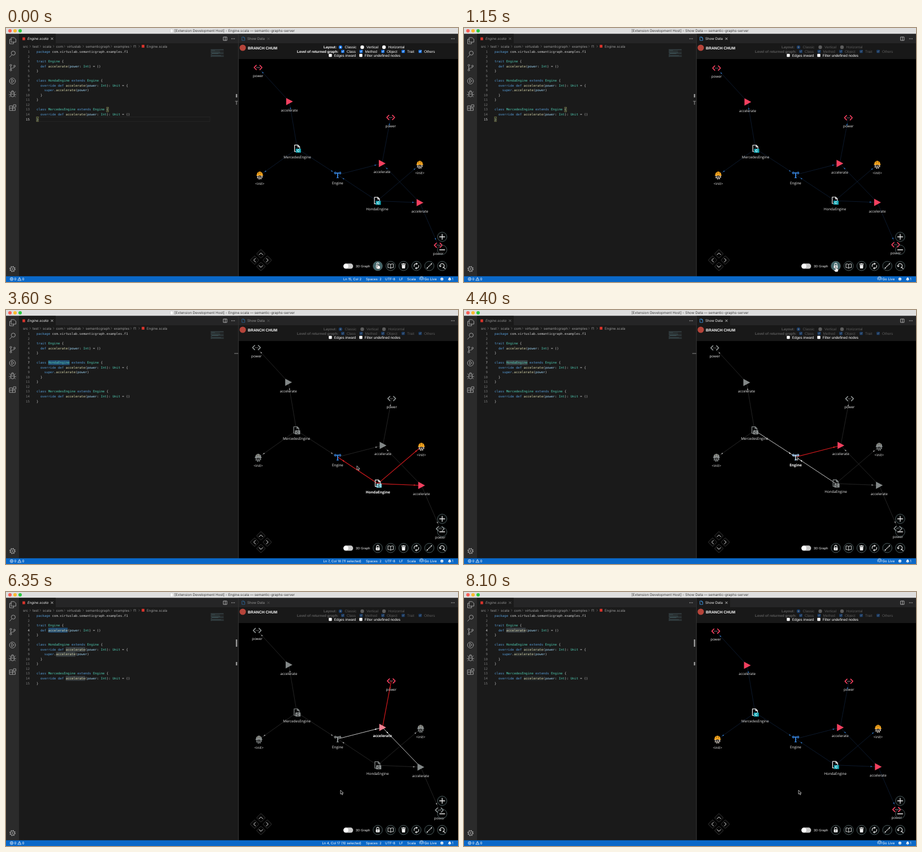
An HTML page that plays this animation: 800 px wide and 450 px high, repeating every 8200 ms.

```html
<!DOCTYPE html>
<html lang="en">
<head>
<meta charset="utf-8">
<title>Code graph</title>
<style>
html, body { margin: 0; width: 100%; height: 100%; overflow: hidden; background: #000; }
svg { display: block; width: 800px; height: 450px; }
text { white-space: pre; text-rendering: geometricPrecision; }
.ui { font-family: Inter, sans-serif; font-size: 6.1px; }
.code { font-family: "DejaVu Sans Mono", monospace; font-size: 5.72px; }
.web { font-family: "Liberation Sans", sans-serif; font-size: 6.4px; }
.node { font-family: "Open Sans", sans-serif; font-size: 6.3px; fill: #eee; text-anchor: middle; }
.node.bold { font-size: 6.5px; font-weight: 700; fill: #fff; }
.line { fill: none; stroke-linecap: round; stroke-linejoin: round; }
</style>
</head>
<body>
<svg viewBox="0 0 800 450">
  <g id="base"></g>
  <g id="marks"></g>
  <g id="code"></g>
  <g id="chrome"></g>
  <g id="graph"></g>
  <g id="tools"></g>
  <g id="pointer"></g>
</svg>
<script>
const LOOP = 8200, CHAR = 3.446, ROW = 8.54, LEFT = 54;
const put = (id, html) => { document.getElementById(id).innerHTML = html; };
const rect = (x, y, w, h, fill, more = '') =>
  `<rect x="${x}" y="${y}" width="${w}" height="${h}" fill="${fill}" ${more}/>`;
const disc = (x, y, r, fill, more = '') => `<circle cx="${x}" cy="${y}" r="${r}" fill="${fill}" ${more}/>`;
const path = (d, fill, more = '') => `<path d="${d}" fill="${fill}" ${more}/>`;
const line = (d, color, w = 1, more = '') =>
  `<path class="line" d="${d}" stroke="${color}" stroke-width="${w}" ${more}/>`;
const text = (x, y, s, fill, cls = 'ui', more = '') =>
  `<text x="${x}" y="${y}" class="${cls}" fill="${fill}" ${more}>${s}</text>`;
const at = (x, y, s) => `<g transform="translate(${x} ${y})">${s}</g>`;
const rowMid = n => 42 + ROW * (n - 1);

// Value of the last step that has begun
const stepAt = (steps, t) => steps.filter(s => s[0] <= t).pop()[1];

// Eased value between [time, ...values] keys
function tween(keys, t) {
  const i = keys.findIndex(k => k[0] > t);
  if (i < 0) return keys[keys.length - 1].slice(1);
  const a = keys[i - 1], b = keys[i], u = (t - a[0]) / (b[0] - a[0]), e = u * u * (3 - 2 * u);
  return a.slice(1).map((v, k) => v + (b[k + 1] - v) * e);
}

// Timeline
const FOCUS = [[0, 'editor'], [850, 'view'], [3400, 'editor'], [4050, 'view'],
  [4550, 'editor'], [5300, 'view'], [5800, 'editor'], [6750, 'view']];
const PLACE = [[0, 0], [3400, 1], [4550, 2], [5800, 3]];
const PICK = [[0, ''], [3200, 'honda'], [4300, 'engine'], [5550, 'acc2'], [6800, '']];
const PRESSES = [2950, 4050, 5300];
const SPREAD = [[0, 1.006], [1150, 1], [3150, 1], [3350, 1.027], [3600, 1.026], [5150, 1.02],
  [5300, 1.02], [6350, 1.017], [7100, 1.011], [8000, 1.011], [8200, 1.009]];
const POINTER = [[0, 658, 418], [850, 658, 419], [1150, 658, 423], [2000, 658, 423], [2750, 656, 303],
  [3200, 656, 303], [3600, 621, 276], [3950, 587, 258], [4500, 587, 258], [5100, 664, 241],
  [5600, 664, 241], [6250, 592, 351]];

// Editor
const SOURCE = `package com.virtuslab.semanticgraph.examples.f1

trait Engine {
  def accelerate(power: Int) = ()
}

class HondaEngine extends Engine {
  override def accelerate(power: Int): Unit = {
    super.accelerate(power)
  }
}

class MercedesEngine extends Engine {
  override def accelerate(power: Int): Unit = ()
}`.split('\n');
const PLACES = [
  { row: 15, status: 'Ln 15, Col 2' },
  { row: 7, word: 'HondaEngine', status: 'Ln 7, Col 18 (11 selected)' },
  { row: 3, word: 'Engine', status: 'Ln 3, Col 13 (6 selected)' },
  { row: 4, word: 'accelerate', status: 'Ln 4, Col 17 (10 selected)' }
];
const RULER = [[[117, 6]], [], [[77, 6], [117, 6]], [[84, 13], [124, 6]]];

function paint(s) {
  const colors = [[/^(package|trait|class|extends|override|def|super)$/, '#569cd6'],
    [/^(\w*Engine|Int|Unit)$/, '#4ec9b0'], [/^accelerate$/, '#d6d6aa'], [/^power$/, '#9cd0ee']];
  return s.replace(/\w+/g, w => {
    const hit = colors.find(c => c[0].test(w));
    return hit ? `<tspan fill="${hit[1]}">${w}</tspan>` : w;
  });
}

function drawCode(place) {
  return SOURCE.map((s, i) => {
    const y = rowMid(i + 1) + 2;
    return text(42, y, i + 1, i + 1 === place.row ? '#d0d0d0' : '#7c7c7c', 'code', 'text-anchor="end"')
      + text(LEFT, y, paint(s), '#cfcfcf', 'code');
  }).join('');
}

function drawMarks(index, focused, faint) {
  const place = PLACES[index], cell = (row, col, len, fill, more) =>
    rect(LEFT + CHAR * col, rowMid(row) - ROW / 2, CHAR * len, ROW, fill, more);
  let out = '';
  if (place.word) SOURCE.forEach((s, i) => {
    for (const m of s.matchAll(new RegExp(place.word, 'g'))) {
      const main = i + 1 === place.row;
      out += cell(i + 1, m.index, place.word.length,
        main ? (focused ? '#234d73' : '#393e42') : faint ? '#202324' : index === 2 ? '#1f3537' : '#363b3e');
    }
  });
  else {
    if (focused) out += rect(LEFT, rowMid(place.row) - 4.2, 307, 8.4, 'none', 'stroke="#292929" stroke-width=".7"');
    for (const [row, col] of [[13, 36], [15, 0]])
      out += cell(row, col, 1, '#23301f', 'stroke="#8f8a55" stroke-width=".6"');
  }
  for (const [y, h] of RULER[index]) out += rect(406.8, y, 2.4, h, '#9a9a9a');
  if (index === 0) out += text(405.2, 136, 'T', '#aaa', 'code', 'style="font-size:9px"');
  if (index === 1) out += rect(404, 76.5, 7, 1, '#888');
  return out;
}

// Window
function drawBase() {
  let s = rect(0, 0, 800, 450, '#1a1a1a') + rect(0, 0, 800, 10.5, '#dedede')
    + rect(0, 10.5, 23, 429.3, '#2b2b2b') + rect(23, 10.5, 777, 16.5, '#252526')
    + rect(412, 27, 388, 28, '#181818') + rect(412, 55, 388, 385, '#000')
    + rect(410.8, 10.5, 1, 429.3, '#333') + rect(0, 439.8, 800, 10.2, '#0a68c8');
  ['#fb5f57', '#fcbb2e', '#2ac840'].forEach((c, i) => { s += disc(7 + 9 * i, 5, 3, c); });
  const icons = [
    [22, 'M-2-5h5l3 3v5h-8zM-2-2h-3v8h7v-3'],
    [46, 'M5-1.5a3.6 3.6 0 1 1-7.2 0a3.6 3.6 0 1 1 7.2 0M-1 1.5L-5 5.5'],
    [70, 'M-3-2v5M3.5-1c0 3-6.5 1-6.5 4M-1.5-4a1.5 1.5 0 1 1-3 0a1.5 1.5 0 1 1 3 0M5-2.5a1.5 1.5 0 1 1-3 0a1.5 1.5 0 1 1 3 0M-1.5 4.5a1.5 1.5 0 1 1-3 0a1.5 1.5 0 1 1 3 0'],
    [94, 'M5.3 0a5.3 5.3 0 1 1-10.6 0a5.3 5.3 0 1 1 10.6 0M-1.5-3v6l4-3z'],
    [117, 'M-3-1a3 3 0 0 1 6 0v3a3 3 0 0 1-6 0zM-3 0h6M-5-4l2 2M5-4l-2 2M-6 1h3M6 1h-3M-5 5l2-2M5 5l-2-2M-2-4a2 2 0 0 1 4 0'],
    [141, 'M-5-3h5v8h-5zM-5 1h10v4h-5M2-5h4v4h-4z']
  ];
  for (const [y, d] of icons) s += at(11.5, y, line(d, '#9c9c9c', 1));
  s += at(11.5, 427, disc(0, 0, 4.6, 'none', 'stroke="#9c9c9c" stroke-width="1.6" stroke-dasharray="1.9 1.7"')
    + disc(0, 0, 3.6, 'none', 'stroke="#9c9c9c"') + disc(0, 0, 1.2, '#9c9c9c'));

  const crumbs = [[30, 'src'], [47, 'test'], [65, 'scala'], [88.5, 'com'], [108, 'virtuslab'],
    [141, 'semanticgraph'], [191, 'examples'], [225.5, 'f1'], [249, 'Engine.scala']];
  crumbs.forEach(([x, w], i) => {
    s += text(x, 34.5, w, '#9a9a9a');
    if (i) s += line(`M${i === 8 ? 235 : x - 5} 31l1.5 1.5l-1.5 1.5`, '#777', .6);
  });
  s += rect(240.2, 29.8, 4.8, 5, '#d8342c') + rect(362, 37, 23.5, 14.5, '#222425');
  SOURCE.forEach((w, i) => {
    const pad = w.search(/\S/);
    if (pad >= 0) s += line(`M${363 + pad * .46} ${38.4 + i * .88}h${(w.length - pad) * .46}`, '#53757c', .45);
  });
  s += dots(399.5, 19) + dots(788.5, 19);

  // Status bar
  s += disc(10, 444.8, 2.6, 'none', 'stroke="#fff" stroke-width=".8"')
    + line('M9 443.8l2 2M11 443.8l-2 2', '#fff', .7) + text(14.6, 447, '0', '#fff')
    + line('M24 442.2l2.8 5h-5.6zM24 444v1.3', '#fff', .7) + text(28.6, 447, '0', '#fff')
    + line('M735.5 444v3M733.8 445.5a2.2 2.2 0 1 1 3.4 0M732.9 446.5a3.6 3.6 0 1 1 5.2 0', '#fff', .6)
    + text(740.5, 447, 'Go Live', '#fff')
    + disc(771.5, 444.8, 2.6, '#fff') + line('M770 445.4a1.6 1.6 0 0 0 3 0M770.6 443.9v.1M772.4 443.9v.1', '#0a68c8', .6)
    + path('M782.2 446.4c1.3-1 .8-4.4 3-4.4s1.7 3.4 3 4.4zM784.4 447h1.6v.7h-1.6z', '#fff')
    + text(789.2, 447, '1', '#fff');

  return s + disc(419, 35, 5.6, '#b5443a') + text(428, 37.6, 'BRANCH CHUM', '#fff', 'web', 'style="font-size:6.85px;font-weight:700"');
}

function dots(x, y) {
  return [0, 2.4, 4.8].map(d => disc(x + d, y, .65, '#c4c4c4')).join('');
}

const cross = (x, color) => line(`M${x - 1.7} 17.3l3.4 3.4m0-3.4l-3.4 3.4`, color, .8);

function drawChrome(view, status, dim) {
  const bright = '#f2f2f2', dull = '#929292';
  let s = text(view ? 400 : 404.5, 7.4, `[Extension Development Host] - ${view ? 'Show Data' : 'Engine.scala'} — semantic-graphs-server`,
    '#3c3c3c', 'ui', 'text-anchor="middle" style="font-size:6.2px"');
  if (!view) s += path('M291 2h3l1.5 1.5v4.5h-4.5z', '#fff', 'stroke="#b4b4b4" stroke-width=".4"');
  s += rect(23, 10.5, 65, 16.5, '#1a1a1a') + rect(29.2, 16.6, 4.6, 5, '#d8342c')
    + text(38, 21.3, 'Engine.scala', view ? dull : bright, 'ui', 'font-style="italic"') + cross(81.5, view ? '#777' : '#ddd')
    + rect(412, 10.5, 59, 16.5, view ? '#1a1a1a' : '#252526')
    + line('M418 16h2.8l1.8 1.8v4.2h-4.6zM420.8 16v1.8h1.8', view ? '#3f93dc' : '#2c5f8c', .9)
    + text(427, 21.3, 'Show Data', view ? bright : dull) + cross(464.5, view ? '#ddd' : '#555');
  const sx = view ? 776 : 388;
  s += line(`M${sx - 3} 16h6v6h-6zM${sx} 16v6`, '#c4c4c4', .8);
  if (status) s += text(629, 447, status, '#fff', 'ui', 'text-anchor="end" style="font-size:5.9px"')
    + [[637, 'Spaces: 2'], [671, 'UTF-8'], [696, 'LF'], [710, 'Scala']]
      .map(([x, w]) => text(x, 447, w, '#fff', 'ui', 'style="font-size:5.9px"')).join('');

  // Graph options
  const ink = dim ? '#5c5c5c' : '#fff', blue = dim ? '#183c69' : '#1673e6', bold = 'font-weight="700"';
  s += text(562, 36.4, 'Layout:', ink, 'web', bold) + text(515, 43.8, 'Level of returned graph:', ink, 'web', bold);
  [[592, 'Classic'], [630.5, 'Vertical'], [669, 'Horizontal']].forEach(([x, w], i) => {
    s += disc(x, 34, 3.2, i ? (dim ? '#5c5c5c' : '#fff') : blue) + (i ? '' : disc(x, 34, 1.2, dim ? '#777' : '#fff'))
      + text(x + 7.6, 36.4, w, ink, 'web');
  });
  [[596, 'Class'], [628.5, 'Method'], [667, 'Object'], [703, 'Trait'], [733, 'Others']].forEach(([x, w]) => {
    s += rect(x - 2.8, 38.7, 5.6, 5.6, blue, 'rx="1"') + line(`M${x - 1.5} 41.6l1.2 1.3l2-3`, dim ? '#777' : '#fff', .8)
      + text(x + 7, 43.8, w, ink, 'web');
  });
  [[574, 'Edges inward'], [628, 'Filter undefined nodes']].forEach(([x, w]) => {
    s += rect(x - 2.7, 45.8, 5.4, 5.4, '#fff', 'rx="1"') + text(x + 6.7, 50.8, w, '#fff', 'web');
  });
  return s;
}

// Graph
const NODES = {
  power1: ['power', 447, 71], acc1: ['accelerate', 502, 131], mercedes: ['MercedesEngine', 516, 214],
  init1: ['&lt;init&gt;', 450, 261], engine: ['Engine', 587, 260], acc2: ['accelerate', 665, 240],
  power2: ['power', 680.3, 159], honda: ['HondaEngine', 656.5, 306], init2: ['&lt;init&gt;', 731.5, 242],
  acc3: ['accelerate', 731.5, 309], power3: ['power', 764, 384]
};
const EDGES = ['acc1 power1', 'mercedes acc1', 'mercedes init1', 'mercedes engine', 'engine acc2', 'acc2 power2',
  'honda engine', 'honda init2', 'honda acc3', 'acc3 acc2', 'acc3 power3'].map(e => e.split(' '));

// Each icon takes its state: on = coloured, lit = selected
const doc = (on, lit) => line('M-4.8-6.5h6l3 3v8.5h-9zM1-6.5v3.2h3.2', on ? '#f0f0f0' : '#8a8f8f', 1.2)
  + rect(-2.5, 0, 9, 7, lit ? '#8bdcec' : on ? '#12a5b3' : '#8a8f8f')
  + line('M3.4 2.3a1.9 1.9 0 1 0 0 2.5', on && !lit ? '#fff' : '#222', 1);
const ICONS = {
  power: (on, lit) => line('M-3.2-3.8l-3.7 3.8l3.7 3.8M3.2-3.8l3.7 3.8l-3.7 3.8', lit ? '#f58b9b' : on ? '#f2405f' : '#8a8f8f', 1.7)
    + line('M-2.2 0h.1M0 0h.1M2.2 0h.1', on ? '#e8c8d2' : '#aaa', 1.2),
  accelerate: (on, lit) => path('M-5.6-6.4L6.4 0L-5.6 6.4z', lit ? '#f18292' : on ? '#f2405f' : '#838888'),
  MercedesEngine: doc, HondaEngine: doc,
  Engine: (on, lit) => {
    const c = lit ? '#a6cdf2' : on ? '#347ccf' : '#8a8f8f';
    return line('M-4-3.2h8M0-3v8', c, 2) + line('M-4-5.4l-2 2.2l2 2.2M4-5.4l2 2.2l-2 2.2M-1.6 5.4h3.2', c, 1.1);
  },
  '&lt;init&gt;': on => {
    const hat = on ? '#f7a51c' : '#8a8f8f', gear = on ? '#d8cfc4' : '#8a8f8f';
    return disc(0, 2.2, 4.3, 'none', `stroke="${gear}" stroke-width="1.7" stroke-dasharray="2 1.4"`)
      + disc(0, 2.2, 3.2, '#222', `stroke="${gear}" stroke-width=".9"`) + disc(0, 3, 1.1, gear)
      + path('M-5.3-1a5.3 5.8 0 0 1 10.6 0l1.2 1.4h-13z', hat) + line('M-1.8-5.6v3M1.8-5.6v3', '#40300f', .6);
  }
};

function drawGraph(t, tip) {
  const pick = stepAt(PICK, t), [k] = tween(SPREAD, t), pos = {};
  let hover = '', out = '';
  for (const id in NODES) {
    const [, x, y] = NODES[id];
    pos[id] = [588 + (x - 588) * k, 242 + (y - 242) * k];
    if (Math.hypot(pos[id][0] - tip[0], pos[id][1] - tip[1]) < 7) hover = id;
  }
  for (const [a, b] of EDGES) {
    const [x1, y1] = pos[a], [x2, y2] = pos[b], near = hover && (a === hover || b === hover);
    let color = '#12253f', tipColor = '#2a6cb4', w = .7;
    if (!pick && near) [color, tipColor, w] = ['#155da6', '#2f86dc', .9];
    else if (pick && a === pick) [color, tipColor, w] = ['#d81a1e', '#f0282c', 1.15];
    else if (pick && b === pick) [color, tipColor, w] = ['#c4c4c4', '#fff', 1];
    else if (pick && near) [color, tipColor, w] = ['#909090', '#eee', .85];
    else if (pick) [color, tipColor] = ['#343434', '#a0a0a0'];
    out += line(`M${x1} ${y1}L${x2} ${y2}`, color, w);
    const turn = Math.atan2(y2 - y1, x2 - x1) * 180 / Math.PI;
    out += `<path d="M-10-0L-13.4-1.3v2.6z" fill="${tipColor}" transform="translate(${x2} ${y2}) rotate(${turn})"/>`;
  }
  const pressed = PRESSES.some(p => t >= p && t < p + 250);
  for (const id in NODES) {
    const [name] = NODES[id], [x, y] = pos[id], lit = id === pick;
    const on = !pick || lit || id === hover || EDGES.some(e => e[0] === pick && e[1] === id);
    const ring = pressed && id === hover ? disc(-1.5, 1, 10.6, '#262626', 'stroke="#6a6a6a" stroke-width="1.2"') : '';
    out += at(x, y, ring + ICONS[name](on, lit)
      + text(0, name === 'accelerate' ? 17.5 : 17, name, '#eee', lit || id === hover ? 'node bold' : 'node'));
  }
  return out;
}

// Controls over the graph
function drawTools(locked, hover) {
  const edge = 'stroke="#536466" stroke-width=".9"', white = '#f0f0f0';
  const button = (x, y, icon, fill = '#050808') => at(x, y, disc(0, 0, 8.3, fill, edge) + icon);
  let s = '';
  for (let i = 0; i < 4; i++)
    s += `<g transform="translate(451.2 411.3) rotate(${i * 90}) translate(0 -11.2)">`
      + rect(-5.6, -5.6, 11.2, 11.2, '#050505', 'rx="1.6" transform="rotate(45)" stroke="#404040" stroke-width=".8"')
      + line('M-3.2 1.6L0-1.6L3.2 1.6', white, 1) + '</g>';
  s += button(772, 370, line('M-4.5 0h9M0-4.5v9', white, 1.3)) + button(772, 393, line('M-4.5 0h9', white, 1.3), 'none')
    + rect(597, 417.3, 17.4, 9.2, '#c9c9c9', 'rx="4.6"') + disc(601.8, 421.9, 4.2, '#fff')
    + text(619, 424, '3D Graph', white, 'web', 'style="font-size:5.8px"');
  const lock = rect(-3.4, -.8, 6.8, 5, white, 'rx=".8"') + disc(0, 1.5, .8, '#111')
    + line(locked ? 'M-2.1-1v-1.6a2.1 2.1 0 0 1 4.2 0v1.6' : 'M-2.1-1v-2.4a2.1 2.1 0 0 1 4.2 0', white, 1.1);
  const icons = [lock,
    line('M0-2.6c-1.5-1.2-3-1.2-4.8-1v6.6c1.8-.2 3.3 0 4.8 1c1.5-1 3-1.2 4.8-1v-6.6c-1.8-.2-3.3-.2-4.8 1v6.6', white, .9),
    path('M-3.2-2h6.4l-.6 6.5h-5.2zM-4-4h2.5l.6-.9h1.8l.6.9h2.5v1.2h-8z', white),
    line('M-4 1a4 4 0 0 1 5.4-4.8M4-1a4 4 0 0 1-5.4 4.8M.2-5.3l1.5 1.5l-2 1.2M-.2 5.3l-1.5-1.5l2-1.2', white, 1.1),
    line('M-3.6 3.6L3.6-3.6', white, 1.1, 'stroke-dasharray="1.6 1.5"') + disc(-3.8, 3.8, 1, white) + disc(3.8, -3.8, 1, white),
    line('M-3.6 1.2a3.8 3.8 0 1 1 4.8 2M2.4 2.2l2.8 2.8M-5-.6l1.4 2l1.8-1.6', white, 1.1)];
  icons.forEach((icon, i) => { s += button(658 + i * 22.8, 421.6, icon, i === 0 && hover ? '#42666a' : undefined); });
  return s;
}

function drawPointer(t, [x, y]) {
  const outline = 'stroke-width=".6" stroke-linejoin="round"';
  return at(x, y, t < 2050
    ? path('M-.9 0q.9-1 1.8 0v3q1.4-.5 1.7.5q1.6-.3 1.7 1v2.2q-.3 1.4-1 2.3h-4.2q-1.2-1.4-2.6-3.5q.4-1.4 2.6.2z', '#fff', `stroke="#222" ${outline}`)
    : path('M0 0v7.2l1.7-1.5l1.2 2.7l1.3-.6l-1.2-2.6h2.2z', '#111', `stroke="#fff" ${outline}`));
}

// Rewrites a group only when its state changes
const shown = {};
function refresh(id, key, make) {
  if (shown[id] !== key) { shown[id] = key; put(id, make()); }
}

function frame() {
  const t = performance.now() % LOOP, tip = tween(POINTER, t);
  const view = stepAt(FOCUS, t) === 'view', place = stepAt(PLACE, t);
  // The status bar follows the focus a moment later
  const late = Math.max(0, t - 50);
  const status = stepAt(FOCUS, late) === 'view' ? '' : PLACES[stepAt(PLACE, late)].status;
  const locked = t >= 850, over = Math.hypot(tip[0] - 658, tip[1] - 421.6) < 9, faint = t > 6900;
  refresh('code', place, () => drawCode(PLACES[place]));
  refresh('marks', [place, view, faint].join(), () => drawMarks(place, !view, faint));
  refresh('chrome', [view, status, locked].join(), () => drawChrome(view, status, locked));
  refresh('tools', [locked, over].join(), () => drawTools(locked, over));
  put('graph', drawGraph(t, tip));
  put('pointer', drawPointer(t, tip));
  requestAnimationFrame(frame);
}

put('base', drawBase());
frame();
</script>
</body>
</html>
```
